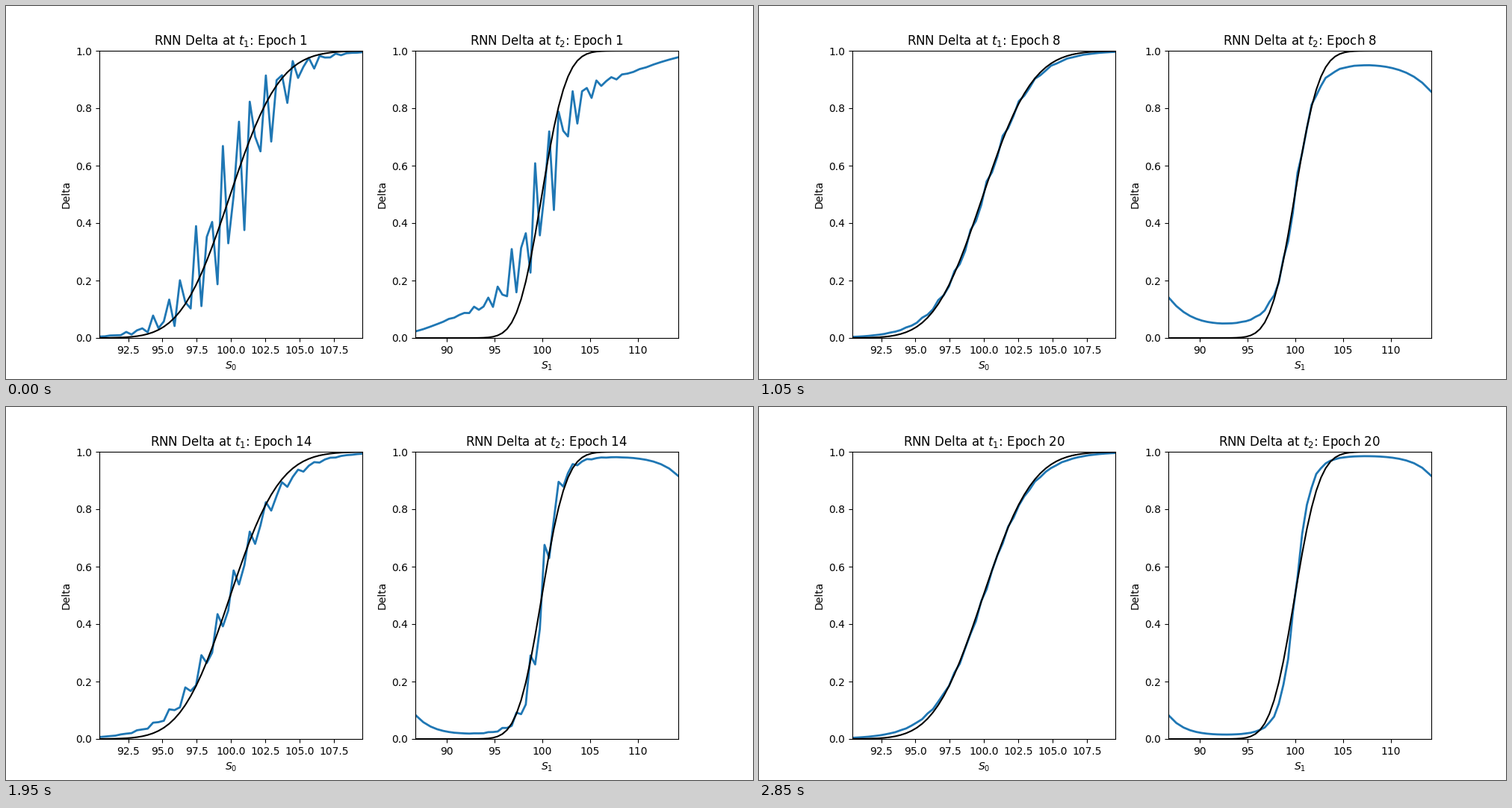
These frames come from a looping animation (1000x500 px, 3.75 s). A matplotlib script:

```python
import math

import matplotlib.pyplot as plt
import numpy as np
from matplotlib.animation import FuncAnimation

POINTS = 50
EPOCHS = 20
HOLD = 5          # extra ticks on the last epoch
TICK_MS = 150

index = np.arange(POINTS)
u = np.linspace(-1, 1, POINTS)
spot0 = 100 + 9.6 * u
# The second grid is even in the middle and stretches towards both ends.
spot1 = 100 + 12 * u + np.where(u < 0, -1.28 * np.abs(u) ** 8, 2.23 * np.abs(u) ** 5.5)

# Shape of the learned curves at a few key epochs.
KEY_EPOCHS = [1, 4, 8, 12, 14, 16, 20]
SLOPE = [5.3, 5.5, 5.6, 5.1, 5.0, 5.0, 5.5]       # first panel, logit slope
PLATEAU = [2.4, 2.55, 3.1, 4.05, 4.2, 4.05, 4.4]  # second panel, logit height
RISE = [2.5, 2.5, 3.4, 3.4, 3.2, 3.3, 3.4]        # second panel, steepness
DROOP = [-1.4, -.25, 1.3, 1.55, 1.8, 2.05, 2.0]   # second panel, fall at the ends
WOBBLE = [.2, .024, .012, .01, .05, .014, .006]
PERIOD = [2.6, 2.3, 3.0, 3.0, 2.95, 2.5, 2.5]     # wobble period in grid points
CREST = [23.1, 22, 22, 22, 22, 24, 24]            # grid point of one wobble crest


def at(epoch, values):
    return np.interp(epoch, KEY_EPOCHS, values)


def sigmoid(z):
    return 1 / (1 + np.exp(-z))


def wobble(epoch):
    """Sideways ripple of the curve, strongest at the strike."""
    size = math.exp(at(epoch, np.log(WOBBLE)))
    phase = (index - at(epoch, CREST)) / at(epoch, PERIOD)
    return size * (1 - u ** 2) * np.cos(2 * math.pi * phase)


def learned_delta0(epoch):
    return sigmoid(at(epoch, SLOPE) * (u + wobble(epoch)))


def learned_delta1(epoch):
    rise = np.tanh(at(epoch, RISE) * (u + 0.7 * wobble(epoch)))
    return sigmoid(at(epoch, PLATEAU) * rise - at(epoch, DROOP) * np.sign(u) * u ** 6)


def exact_delta(spot, sigma):
    d1 = np.log(spot / 100) / sigma + sigma / 2
    return [0.5 * (1 + math.erf(d / math.sqrt(2))) for d in d1]


fig, axes = plt.subplots(1, 2, figsize=(10, 5), dpi=100)
learned = (learned_delta0, learned_delta1)
sigmas = (0.2 * math.sqrt(0.02), 0.2 * math.sqrt(0.01))
lines = []
for i, (ax, spot, sigma) in enumerate(zip(axes, (spot0, spot1), sigmas)):
    lines += ax.plot(spot, learned[i](1), color="C0", linewidth=2)
    ax.plot(spot, exact_delta(spot, sigma), color="black", linewidth=1.5)
    ax.set(xlim=(spot[0], spot[-1]), ylim=(0, 1), xlabel=f"$S_{i}$", ylabel="Delta")


def update(tick):
    epoch = min(tick + 1, EPOCHS)
    for i, (ax, line) in enumerate(zip(axes, lines)):
        line.set_ydata(learned[i](epoch))
        ax.set_title(f"RNN Delta at $t_{i + 1}$: Epoch {epoch}")
    return lines


anim = FuncAnimation(fig, update, frames=EPOCHS + HOLD, interval=TICK_MS,
                     init_func=lambda: update(0), repeat=True, repeat_delay=0)
plt.show()
```
